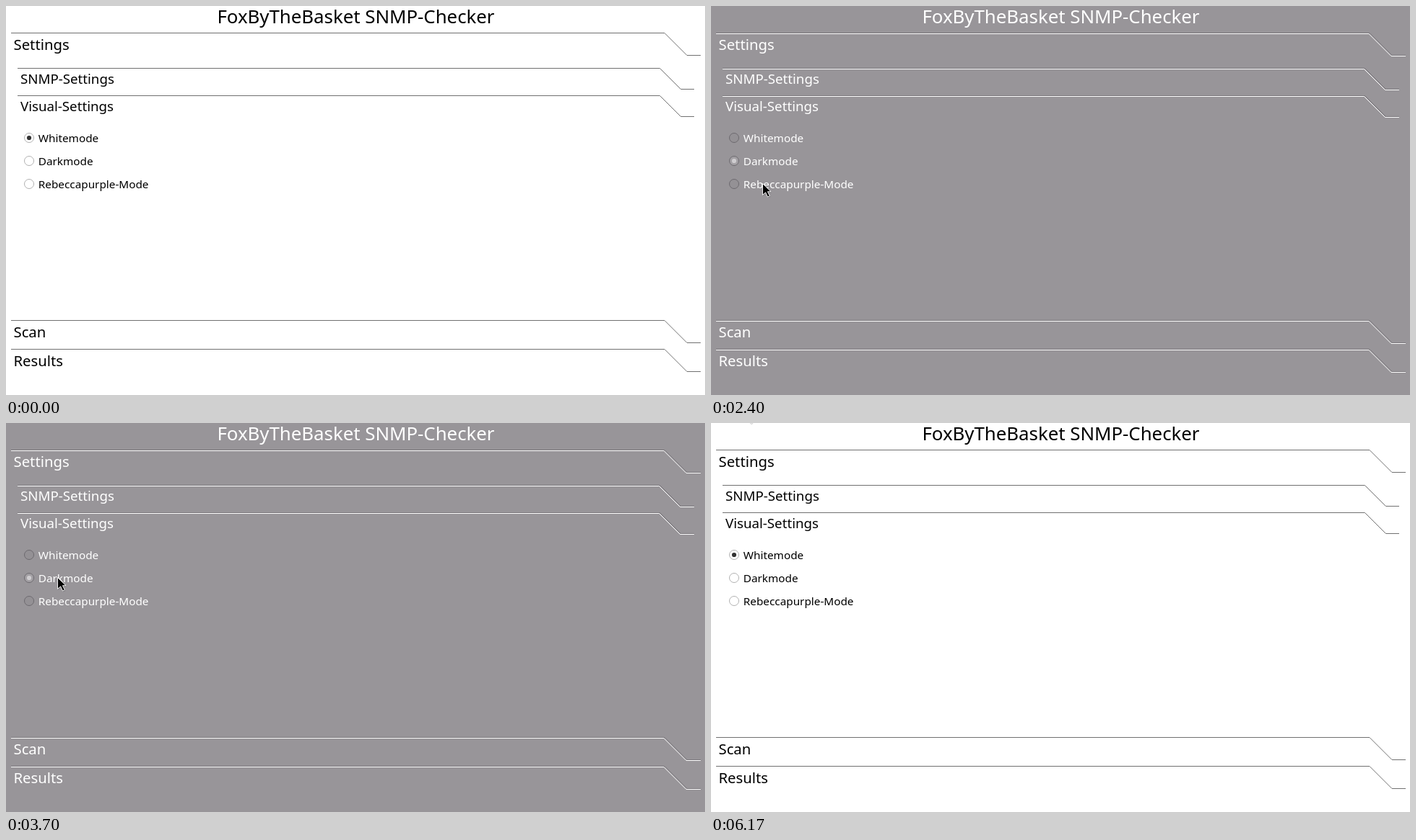
Recreate the animation shown at these times as an HTML page. Size 968 px wide and 540 px high, loop 6360 ms.

```html
<!DOCTYPE html>
<html lang="en">
<head>
<meta charset="utf-8">
<title>Scanner settings</title>
<style>
  html, body { margin: 0; width: 100%; height: 100%; overflow: hidden; }
  svg { display: block; width: 968px; height: 540px; background: var(--bg); }
  text { font-family: "Noto Sans", "Open Sans", sans-serif; fill: var(--ink); }
  .title { font-size: 25.8px; text-anchor: middle; }
  .main { font-size: 20.3px; }
  .sub { font-size: 18.7px; }
  .option { font-size: 15.3px; }
  .edge { fill: none; stroke: var(--edge); }
  .glow { fill: none; stroke: #fff; }
  .ring { fill: var(--fill); stroke: var(--ring); }
  .dot { fill: var(--dot); visibility: hidden; }
  .on .ring { fill: var(--lit); }
  .on .dot { visibility: visible; }
  .pressed .ring { fill: #8459ac; }
  .white {
    --bg: #fff; --ink: #000; --edge: #707070;
    --fill: #fff; --lit: #fff; --ring: #b1b1b1; --dot: #333;
  }
  .dark {
    --bg: #989599; --ink: #fff; --edge: #78757a;
    --fill: #949195; --lit: #a3a0a4; --ring: #6d6a6f; --dot: #cfcdd0;
  }
  .purple {
    --bg: #639; --ink: #fff; --edge: #5a4470;
    --fill: #623192; --lit: #71459d; --ring: #4c2574; --dot: #d9cde5;
  }
</style>
</head>
<body>
<svg id="stage" class="white" viewBox="0 0 968 540">
  <text class="title" x="484.5" y="23.5">FoxByTheBasket SNMP-Checker</text>
  <g id="panels"></g>
  <g id="options"></g>
  <g id="cursor">
    <path d="M1.5 2V18L5.5 14.5L8.5 20.5L11.5 19L8.5 13.5H13Z" fill="#000" opacity=".14"/>
    <path d="M.5 .5V16.3L4.6 12.8L7.5 19L10.3 17.7L7.4 11.7H12Z" fill="#000" stroke="#fff" stroke-width=".9"/>
  </g>
</svg>
<script>
const NS = "http://www.w3.org/2000/svg";
const LOOP = 6360;
const byId = id => document.getElementById(id);
const stage = byId("stage"), cursor = byId("cursor");

function add(parent, tag, attrs, text) {
  const el = document.createElementNS(NS, tag);
  for (const key in attrs) el.setAttribute(key, attrs[key]);
  if (text) el.textContent = text;
  return parent.appendChild(el);
}

function panel(label, y, nested) {
  const [left, bend, drop, right] = nested ? [16, 905, 29, 953] : [7, 911.5, 31, 962];
  const g = byId("panels");
  const line = (name, shift) => add(g, "path", {
    class: name,
    d: `M${left} ${y + .5 + shift}H${bend + .5 - shift}l${drop} ${drop}H${right}`
  });
  line("glow", 1);
  line("edge", 0);
  add(g, "text", { class: nested ? "sub" : "main", x: nested ? 20 : 10.5, y: y + (nested ? 22 : 24) }, label);
}

panel("Settings", 37);
panel("SNMP-Settings", 86, true);
panel("Visual-Settings", 124, true);
panel("Scan", 436);
panel("Results", 476);

const options = ["Whitemode", "Darkmode", "Rebeccapurple-Mode"].map((label, i) => {
  const y = 183 + i * 32;
  const g = add(byId("options"), "g", {});
  add(g, "circle", { class: "ring", cx: 32, cy: y, r: 6.5 });
  add(g, "circle", { class: "dot", cx: 32, cy: y, r: 3.1 });
  add(g, "text", { class: "option", x: 44.8, y: y + 6 }, label);
  return g;
});

// start, theme, selected option, pressed option
const states = [
  [0, "white", 0, -1],
  [1600, "white", 1, -1],
  [1630, "dark", 1, -1],
  [2670, "purple", 2, -1],
  [3600, "purple", 2, 1],
  [3700, "dark", 1, -1],
  [4700, "white", 0, -1]
];

// start, end, steps, path of the pointer tip
const moves = [
  [430, 830, 13, "M8 -20C40 120 130 300 196 390C240 430 190 350 110 260"],
  [970, 1100, 5, "M110 260Q92 240 75 217"],
  [1800, 2030, 8, "M75 217Q74 242 62 259"],
  [2300, 2400, 4, "M62 259Q66 252 71 246"],
  [2900, 3170, 6, "M71 246Q66 230 71 214"],
  [3930, 4330, 8, "M71 214Q82 198 98 186"],
  [4470, 4500, 2, "M98 186L96 184"],
  [5530, 6130, 14, "M96 184C118 140 104 70 48 -17"],
  [6170, 6170, 1, "M48 -17L47 -18"]
].map(([start, end, steps, d]) => {
  const path = document.createElementNS(NS, "path");
  path.setAttribute("d", d);
  return { start, end, steps, path, length: path.getTotalLength() };
});

function pointerAt(t) {
  const move = moves.filter(m => m.start <= t).pop();
  if (!move) return { x: -50, y: -50 };
  const { start, end, steps, path, length } = move;
  const step = t >= end ? steps : 1 + Math.floor((t - start) / (end - start) * (steps - 1));
  return path.getPointAtLength(length * step / steps);
}

function draw(t) {
  const [, theme, selected, pressed] = states.filter(s => s[0] <= t).pop();
  stage.setAttribute("class", theme);
  options.forEach((g, i) => {
    g.setAttribute("class", (i === selected ? "on " : "") + (i === pressed ? "pressed" : ""));
  });
  const { x, y } = pointerAt(t);
  cursor.setAttribute("transform", `translate(${Math.round(x)} ${Math.round(y)})`);
}

const origin = performance.now();
function tick() {
  draw((performance.now() - origin) % LOOP);
  requestAnimationFrame(tick);
}
draw(0);
tick();
</script>
</body>
</html>
```
